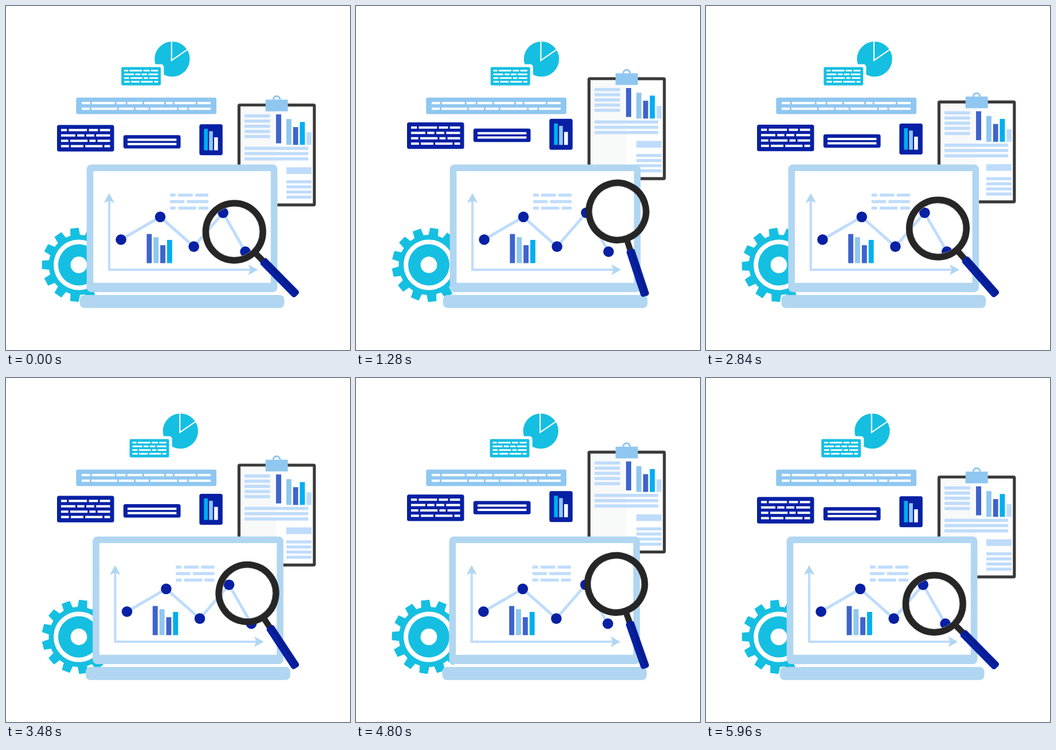
Animation of 600x600 px, one loop 6 s. Source, as an HTML page:

```html
<!DOCTYPE html>
<html lang="en">
<head>
<meta charset="utf-8">
<title>Data analysis</title>
<style>
  html, body { margin: 0; width: 100%; height: 100%; overflow: hidden; background: #fff; }
  svg { display: block; width: 100vw; height: 100vh; }
</style>
</head>
<body>
<svg id="stage" viewBox="0 0 600 600"></svg>
<script>
const LOOP = 6000, STEP = 40, LAST = LOOP / STEP - 1;
const NAVY = '#0720a4', CYAN = '#15bfe1', BLUE = '#3e63cd', SKY = '#8fc7f0',
      BRIGHT = '#02aef0', PALE = '#bfdcfb', SHELL = '#b0d6f1', WHITE = '#fff', INK = '#262626';

const stage = document.getElementById('stage');

function add(parent, tag, attrs = {}) {
  const el = document.createElementNS('http://www.w3.org/2000/svg', tag);
  for (const key in attrs) el.setAttribute(key, attrs[key]);
  return parent.appendChild(el);
}
const group = (parent = stage, transform = '') => add(parent, 'g', { transform });
const box = (g, x, y, width, height, fill, rx = 0) =>
  add(g, 'rect', { x, y, width, height, fill, rx });
const disc = (g, cx, cy, r, fill) => add(g, 'circle', { cx, cy, r, fill });
const shape = (g, d, fill, transform = '') => add(g, 'path', { d, fill, transform });
const stroke = (g, d, color, width) =>
  add(g, 'path', { d, fill: 'none', stroke: color, 'stroke-width': width });

// Fills a row with dashes whose lengths follow a wave.
function dashes(g, x, y, width, height, count, phase, gap, fill) {
  const weights = Array.from({ length: count }, (_, i) => 1 + .55 * Math.sin(phase + 2.4 * i));
  const unit = (width - gap * (count - 1)) / weights.reduce((a, b) => a + b);
  for (const w of weights) {
    box(g, x, y, w * unit, height, fill);
    x += w * unit + gap;
  }
}
function textLines(g, x, y, width, height, count, pitch, fill) {
  for (let i = 0; i < count; i++) box(g, x, y + i * pitch, width, height, fill);
}
function barChart(g, x, base, width, pitch, heights, colors) {
  heights.forEach((h, i) => box(g, x + i * pitch, base - h, width, h, colors[i]));
}

function textPanel(g, fill) {
  box(g, 0, 0, 99.5, 46.3, fill, 3.5);
  [-1.2, 1.2, -.7, -2.4].forEach((phase, i) =>
    dashes(g, 7, 7 + 9.35 * i, 85.5, 4, 4, phase, 3.3, WHITE));
}

function pieCard() {
  const g = group();
  disc(g, 289.4, 92.6, 30.7, CYAN);
  stroke(g, 'M288.3 61V95L316.8 75.3', WHITE, 2.2);
  box(g, 195.3, 101.5, 79.5, 42, WHITE, 5);
  textPanel(group(g, 'translate(200.7 106.5) scale(.692)'), CYAN);
  return g;
}

function wideBanner() {
  const g = group();
  box(g, 122.3, 159.8, 244.7, 28.8, SKY, 3);
  dashes(g, 132, 167.3, 225, 4, 8, -.9, 3, WHITE);
  dashes(g, 132, 177.2, 225, 4, 7, -1.4, 3, WHITE);
}

function darkPanel() {
  const g = group();
  textPanel(group(g, 'translate(89 207.4)'), NAVY);
  return g;
}

function lineBox() {
  const g = group();
  box(g, 204.8, 225.2, 99.7, 23.4, NAVY, 3.5);
  textLines(g, 212, 231.3, 85.3, 4, 2, 7.5, WHITE);
  return g;
}

function barBox() {
  const g = group();
  box(g, 337.3, 206.2, 40.5, 54, NAVY, 3.5);
  barChart(g, 345.4, 251.7, 6.6, 8.8, [37.4, 33.3, 22.7], [BRIGHT, SKY, WHITE]);
  return g;
}

function clipboard() {
  const g = group();
  box(g, 403.8, 170.2, 136.6, 179.4, '#3a3a3a', 4);
  box(g, 409, 175.4, 126.2, 169, WHITE);
  box(g, 409, 175.4, 62.5, 169, '#f8f9f9');
  stroke(g, 'M466 163.5a6 6.2 0 0 1 12 0', SKY, 3);
  box(g, 452.7, 163.3, 38.9, 20.4, SKY);
  textLines(g, 416, 189, 44.5, 5.5, 5, 9, PALE);
  textLines(g, 416, 245.5, 111.3, 5.5, 3, 9.2, PALE);
  textLines(g, 489, 304, 44, 5.3, 4, 8.9, PALE);
  box(g, 489, 281.3, 44, 11.7, PALE);
  box(g, 471, 189, 9, 50.5, BLUE);
  barChart(g, 489, 242.2, 8.8, 11.75, [45, 31, 39.9, 22], [SKY, BLUE, BRIGHT, PALE]);
  return g;
}

function gear() {
  const g = group(), teeth = 13;
  for (let i = 0; i < teeth; i++)
    shape(g, 'M-50 -8.5L-64.3 -7.3V7.3L-50 8.5Z', CYAN, `rotate(${360 / teeth * i})`);
  disc(g, 0, 0, 52.5, CYAN);
  disc(g, 0, 0, 44, WHITE);
  disc(g, 0, 0, 36, CYAN);
  disc(g, 0, 0, 14.4, WHITE);
  return g;
}

function laptop() {
  const g = group();
  box(g, 140.7, 276.4, 332.7, 222.6, SHELL, 8);
  box(g, 152.4, 288, 309.4, 194.8, WHITE);
  box(g, 128.7, 504, 356.7, 22.8, SHELL, 8);

  const arrow = 'M0 0L9.3 17L0 13L-9.3 17Z';
  stroke(g, 'M180 338V460H428', PALE, 4.2);
  shape(g, arrow, SHELL, 'translate(180 326.5)');
  shape(g, arrow, SHELL, 'translate(439.3 460) rotate(90)');
  dashes(g, 286, 327.2, 67, 5.3, 3, -1.9, 4.4, PALE);
  dashes(g, 286, 338.5, 67, 5.3, 2, -.1, 4.4, PALE);
  dashes(g, 286, 349.8, 67, 5.3, 3, -1.3, 4.4, PALE);
  barChart(g, 245.4, 448.5, 8.85, 11.85, [50.8, 45.3, 31.3, 40.5], [BLUE, SKY, BLUE, BRIGHT]);

  const points = [[200.6, 407.5], [269, 367.8], [327.6, 419.6], [378.6, 360.7], [417.5, 428.5]];
  stroke(g, 'M' + points.join('L'), PALE, 5);
  for (const [x, y] of points) disc(g, x, y, 9.3, NAVY);
  return g;
}

// Lies along the x axis with the grip end at the origin.
function magnifier() {
  const g = group(), lens = -149.2;
  const ring = (r, color, width) =>
    add(g, 'circle', { cx: lens, cy: 0, r, fill: 'none', stroke: color, 'stroke-width': width });
  ring(44.2, '#9a9a9a', 1);
  ring(50, INK, 11.2);
  box(g, lens + 53, -5.3, 20, 10.6, INK);
  box(g, lens + 69.5, -7.5, 86.2, 15, NAVY, 4.5);
  box(g, lens + 71, -4.5, 82, 4, '#081b86', 1);
  return g;
}

const pie = pieCard();
wideBanner();
const panel = darkPanel(), lines = lineBox(), bars = barBox(), board = clipboard();
const cog = gear(), pc = laptop(), glass = magnifier();

// Distance covered at the far end of each slide.
const slides = [
  [panel, 0, -4.6], [lines, 0, -11.9], [bars, 0, -9.8], [board, 0, -47.9], [pc, 24, 0]
];

// cubic-bezier(1/6, 1/6, 2/3, 1)
function ease(p) {
  let lo = 0, hi = 1;
  for (let i = 0; i < 30; i++) {
    const s = (lo + hi) / 2;
    if (s * (.5 + s - .5 * s * s) < p) lo = s; else hi = s;
  }
  return lo * (.5 + 2 * lo - 1.5 * lo * lo);
}

// Two trips out and back per loop.
const swing = u => ease(1 - Math.abs(2 * ((2 * u + 1) % 1) - 1));

function draw(time) {
  const u = Math.floor(time % LOOP / STEP) / LAST;
  const main = swing(u), late = swing(u - 1 / 300);
  for (const [el, dx, dy] of slides)
    el.setAttribute('transform', `translate(${dx * main} ${dy * main})`);
  pie.setAttribute('transform', `translate(${35.8 * late} 0)`);
  glass.setAttribute('transform', `translate(503 500) rotate(${45 + 28 * late})`);
  cog.setAttribute('transform', `translate(127 451.5) rotate(${360 * ease(u)})`);
}

function tick() {
  draw(performance.now());
  requestAnimationFrame(tick);
}
tick();
</script>
</body>
</html>
```
